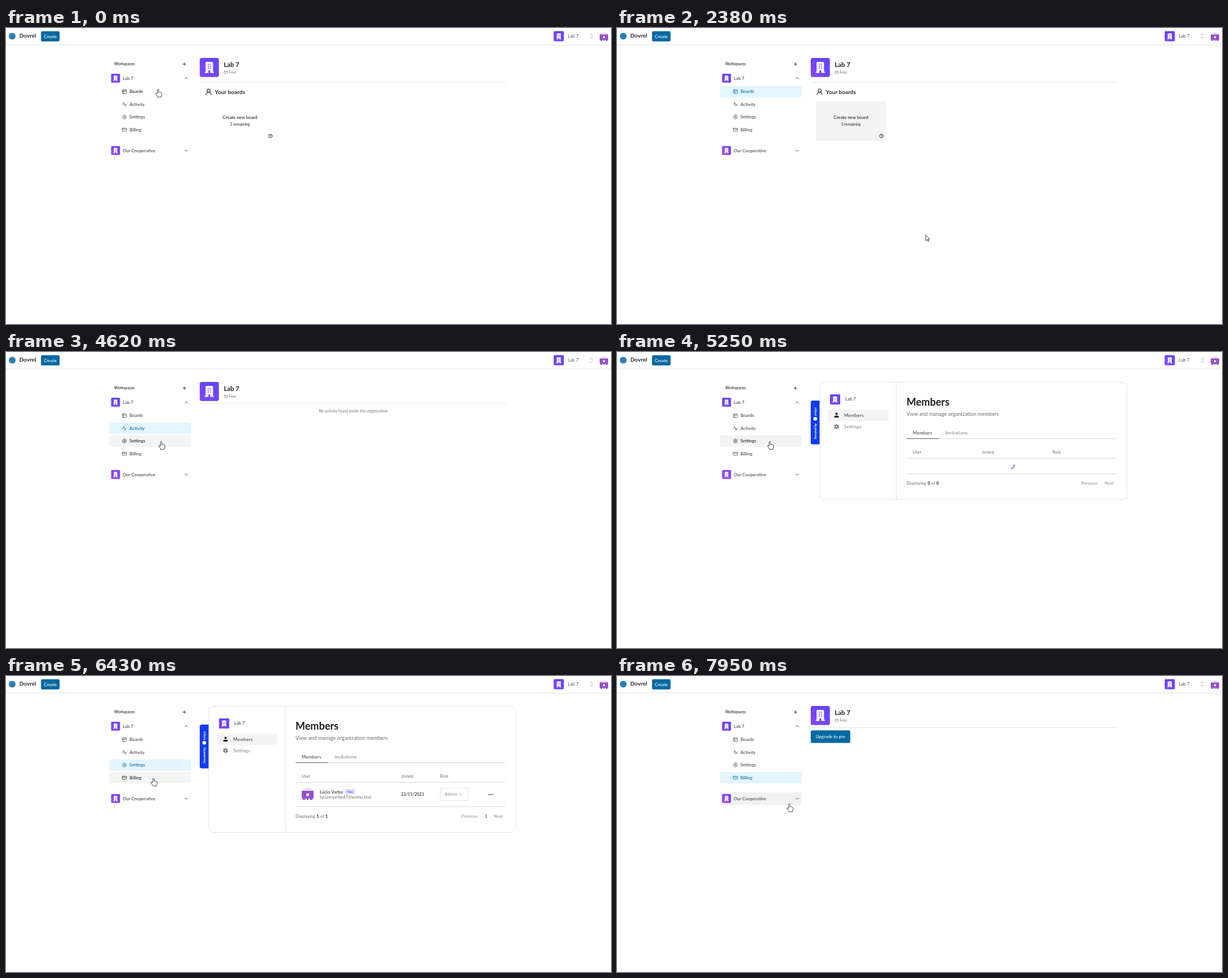
Recreate the animation shown at these times as an HTML page. Size 1068 by 524 pixels, loop 8 s.

```html
<!DOCTYPE html>
<html lang="en">
<head>
<meta charset="utf-8">
<title>Workspace tour</title>
<style>
html, body { margin: 0; width: 100%; height: 100%; overflow: hidden; background: #fff; }
svg { display: block; width: 100vw; height: 100vh; font-family: Lato, "Open Sans", sans-serif; }
text { white-space: pre; }
</style>
</head>
<body>
<svg id="stage" viewBox="0 0 1068 524" xmlns="http://www.w3.org/2000/svg"></svg>
<script>
const LOOP = 8000;
const ORG = 'Lab 7';
const DARK = '#1f1f1f', INK = '#454545', GREY = '#757575', BLUE = '#0369a1', LINE = '#e3e3e3';

const text = (x, y, s, size = 7.875, fill = INK, weight = 500, extra = '') =>
  `<text x="${x}" y="${y}" font-size="${size}" fill="${fill}" font-weight="${weight}" ${extra}>${s}</text>`;
const rect = (x, y, w, h, fill, r = 0, extra = '') =>
  `<rect x="${x}" y="${y}" width="${w}" height="${h}" rx="${r}" fill="${fill}" ${extra}/>`;
const rule = (x1, x2, y, color = LINE, extra = '') =>
  `<path d="M${x1} ${y}H${x2}" stroke="${color}" ${extra}/>`;
const group = (id, body) => `<g id="${id}">${body}</g>`;
const spaced = (n, more = '') => `letter-spacing="${n}" ${more}`;

// Line icons on a 24-unit grid, centred on a point
function gear(r, depth) {
  let d = '';
  for (let i = 0; i < 72; i++) {
    const a = i / 72 * Math.PI * 2;
    const k = r + depth * Math.tanh(2.5 * Math.cos(6 * a));
    d += (i ? 'L' : 'M') + (12 + k * Math.sin(a)).toFixed(2) + ' ' + (12 - k * Math.cos(a)).toFixed(2);
  }
  return d + 'Z';
}
const ICONS = {
  boards: '<rect x="3" y="3" width="18" height="18" rx="2"/><path d="M3 9h18M9 21V9"/>',
  activity: '<path d="M22 12h-4l-3 9L9 3l-3 9H2"/>',
  settings: `<path d="${gear(8.8, 1.2)}"/><circle cx="12" cy="12" r="3"/>`,
  billing: '<rect x="2" y="5" width="20" height="14" rx="2"/><path d="M2 10h20"/>',
  help: '<circle cx="12" cy="12" r="10"/><path d="M9.1 9a3 3 0 0 1 5.8 1c0 2-3 3-3 3M12 17v.1"/>',
  user: '<circle cx="12" cy="8" r="5"/><path d="M20 21a8 8 0 0 0-16 0"/>',
  plus: '<path d="M5 12h14M12 5v14"/>',
  up: '<path d="m18 15-6-6-6 6"/>',
  down: '<path d="m6 9 6 6 6-6"/>',
  updown: '<path d="m6 8 6-6 6 6M6 16l6 6 6-6"/>'
};
const icon = (name, cx, cy, size = 9, color = INK, width = 2) =>
  `<g transform="translate(${cx - size / 2} ${cy - size / 2}) scale(${size / 24})" fill="none" stroke="${color}"
    stroke-width="${width}" stroke-linecap="round" stroke-linejoin="round">${ICONS[name]}</g>`;

// Building badge, centred on a point
const WINDOWS = [3, 5.8, 8.6].map(y => `M4.600 ${y}h1.600v1.600h-1.600zM7.800 ${y}h1.600v1.600h-1.600z`).join('');
const badge = (cx, cy, s, fill = 'url(#violet)') =>
  rect(cx - s / 2, cy - s / 2, s, s, fill, s * .1) +
  `<path transform="translate(${cx} ${cy}) scale(${s * .034}) translate(-7 -8.500)" fill="#fff" fill-rule="evenodd"
    d="M0 15.200V17H5.600V13H8.400V17H14V15.200H12.700V1.400Q12.700 0 11.300 0H2.700Q1.300 0 1.300 1.400V15.200Z${WINDOWS}"/>`;

const avatar = (x, y, s) =>
  `<g transform="translate(${x} ${y}) scale(${s / 21})">
    <path d="M0 7Q2 0 10.500 0T21 7Z" fill="#ecdff4"/>
    <path d="M0 5.500H21V17.500L18.500 21.500H14.500V19H12V21.500H9V19H6.500V21.500H2.500L0 17.500Z" fill="#9750c8"/>
    <rect x="8.300" y="10" width="4.600" height="4.600" fill="#fff"/></g>`;

const NAV = ['boards', 'activity', 'settings', 'billing'];
const rowTop = i => 102.5 + i * 22.5;
const navRow = (name, i) => {
  const cy = rowTop(i) + 10.1;
  return rect(182, rowTop(i), 144, 20.25, 'none', 2.5, `id="bg-${name}"`) +
    `<g id="nav-${name}" color="${INK}">` + icon(name, 209, cy, 9, 'currentColor') +
    text(218, cy + 2.7, name[0].toUpperCase() + name.slice(1), 7.875, 'currentColor') + '</g>';
};

const chrome =
  rule(0, 1068, 30, LINE) +
  '<circle cx="11" cy="14.500" r="6" fill="#2a7fb8"/>' +
  text(23.5, 17.3, 'Dovrel', 10, '#2b2b2b', 700) +
  rect(61.8, 5.7, 32.8, 18, BLUE, 2.2) + text(78.2, 17.500, 'Create', 7.875, '#fff', 500, 'text-anchor="middle"') +
  badge(975.8, 14.6, 18) + text(992, 17, ORG, 7.3, INK, 400, spaced(.2)) +
  icon('updown', 1033.500, 14.500, 9, '#888', 2) + avatar(1048, 7.5, 15) +
  text(191, 66.3, 'Workspaces', 6.75, DARK) + icon('plus', 315, 64, 9, DARK, 2.3) +
  badge(193.4, 88.9, 15.75) + text(206, 91.8, ORG) + icon('up', 318.3, 89, 9, DARK, 2.3) +
  NAV.map(navRow).join('') +
  rect(182, 206, 144, 22.4, 'none', 2.5, 'id="bg-other"') +
  badge(193.4, 216.9, 15.75, 'url(#plum)') + text(206, 219.8, 'Our Cooperative') + icon('down', 318.3, 217, 9, DARK, 2.3);

const header =
  badge(358.9, 69.8, 33.75) + text(384.5, 68.8, ORG, 11.25, DARK, 700) +
  icon('billing', 388.2, 78.6, 7, GREY) + text(393.5, 81, 'Free', 6.75, GREY, 400) +
  rule(342, 884, 0, LINE, 'id="rule"');

const mid = 'text-anchor="middle"';
const boardsPage =
  icon('user', 357.8, 113, 13.5, DARK) + text(368.6, 117, 'Your boards', 10.125, '#303030', 700) +
  rect(351, 130, 124, 69.5, '#f3f3f3', 2, 'id="card"') +
  text(413, 160.8, 'Create new board', 7.875, DARK, 500, mid) +
  text(413, 172.600, '5 remaining', 6.75, DARK, 400, mid) +
  icon('help', 466.6, 191.2, 8, DARK, 2.5);

const loose = (x, y, s, size, fill, weight = 400, ls = .3) => text(x, y, s, size, fill, weight, spaced(ls));
const count = (y, n) => loose(511, y, `Displaying <tspan font-weight="700" fill="#222">${n}</tspan> of <tspan font-weight="700" fill="#222">${n}</tspan>`, 7.3, '#666', 400, .2);
const side = (s, y, ls) => text(0, 0, s, 6.2, '#fff', 700, spaced(ls, `transform="translate(352.300 ${y}) rotate(-90)"`));

const loading =
  loose(644, 180, 'Joined', 7, '#666') + loose(769, 180, 'Role', 7, '#666') +
  '<path id="spin" d="M4 0A4 4 0 0 1 -3.460 2" fill="none" stroke="#3358e8" stroke-width="1.200" stroke-linecap="round"/>' +
  rule(511, 881, 215.8, '#d8d8d8') + count(234.8, 0) +
  loose(819.5, 234.8, 'Previous', 7.3, '#888', 400, .2) + loose(861, 234.8, 'Next', 7.3, '#888', 400, .2);

const dots = [853, 856, 859].map(x => `<circle cx="${x}" cy="210" r="1" fill="#333"/>`).join('');
const loaded =
  loose(697.500, 180, 'Joined', 7, '#666') + loose(766.500, 180, 'Role', 7, '#666') +
  avatar(522, 197.8, 21) + loose(554, 207.9, 'Lúcio Varbo', 7.500, '#222', 500, .2) +
  rect(598.5, 200, 17.5, 9.6, '#d6dcff', 2.5) + text(607.2, 207.200, 'You', 6.4, '#4a60dd', 500, mid) +
  loose(554, 217, 'luciomvarbo47@womu.test', 7.2, '#666', 400, .2) +
  text(697.5, 212.200, '23/11/2023', 7.3, '#222', 500) +
  rect(766.5, 198.5, 49, 22, '#fff', 2, 'stroke="#dcdcdc" stroke-width=".8"') +
  loose(774.5, 212.200, 'Admin', 7.3, '#888') + icon('down', 803, 209.500, 9, '#666') + dots +
  rule(511, 881, 231.4, '#d8d8d8') + count(250.5, 1) +
  loose(803.700, 250.5, 'Previous', 7.3, '#888', 400, .2) + text(845.5, 250.5, '1', 7.3, '#222', 500) +
  loose(861, 250.5, 'Next', 7.3, '#888', 400, .2);

const settingsPage =
  '<path d="M358 86V163.500H345.500Q342 163.500 342 160V89.500Q342 86 345.500 86Z" fill="#123cf0"/>' +
  side('Secured by', 154.500, -.25) + '<circle cx="350" cy="118.300" r="3.300" fill="#fff"/>' +
  side('zelpa', 113.200, .2) +
  rect(358, 53.5, 542, 208, '#fff', 8, `id="panel" stroke="${LINE}"`) +
  '<path id="split" stroke="#dedede"/>' +
  badge(385, 84, 18) + loose(403, 86.3, ORG, 7.3, '#333', 400, .2) +
  rect(372, 102, 107, 20, '#f4f4f4', 2.5) +
  '<circle cx="387.500" cy="109.500" r="2" fill="#222"/><path d="M383.500 116V114.800Q384 112.600 387.500 112.600T391.500 114.800V116Z" fill="#222"/>' +
  loose(401, 114.9, 'Members', 7.875, '#333') +
  `<path transform="translate(382 126.500) scale(.46)" fill="#777" fill-rule="evenodd" d="${gear(8.6, 1.4)}M12 9a3 3 0 1 0 .01 0Z"/>` +
  loose(401, 135, 'Settings', 7.875, '#777') +
  text(511, 95, 'Members', 18, DARK, 700) +
  loose(511, 113, 'View and manage organization members', 9, '#6a6a6a', 400, .1) +
  loose(522, 146.300, 'Members', 7.875, '#333') + loose(580, 146.300, 'Invitations', 7.875, '#777') +
  rule(511, 881, 153.5, '#d8d8d8') + rule(511, 568, 153.3, '#555') +
  loose(522, 180, 'User', 7, '#666') + rule(511, 881, 188.200, '#d8d8d8') +
  group('loading', loading) + group('loaded', loaded);

const upgrade = rect(342, 96.3, 69.8, 22.3, BLUE, 2.5) + text(376.900, 110.200, 'Upgrade to pro', 7.875, '#fff', 500, mid);

const pointer =
  '<g id="cursor" fill="#fff" stroke="#222" stroke-width=".85" stroke-linejoin="round">' +
  '<path id="arrow" d="M0 0V10.200L2.400 8L4 11.500L5.600 10.800L4.100 7.400H7Z"/>' +
  '<path id="hand" d="M-1.300 8V1.200Q-1.300 0-.100 0T1.100 1.200V5.200Q2 4.400 3 5.300Q4.200 4.800 5 5.900Q6.500 5.600 6.500 7V9.500Q6.400 11.500 5.400 12.400V13.800H-1V12.600Q-3.200 10.500-4.200 8Q-4.400 6.400-3 6.900Z"/></g>';

const ramp = (id, a, b) => `<linearGradient id="${id}" x1="0" y1="1" x2="1" y2="0">
  <stop offset="0" stop-color="${a}"/><stop offset=".6" stop-color="${b}"/></linearGradient>`;

document.getElementById('stage').innerHTML =
  `<defs>${ramp('violet', '#8247f8', '#6b45fb')}${ramp('plum', '#a04cf2', '#7f46f8')}</defs>` +
  chrome + group('header', header) + group('boards', boardsPage) +
  group('empty', text(613, 107.400, 'No activity found inside this organization', 6.75, GREY, 400, mid)) +
  group('settings', settingsPage) + group('billing', upgrade) + pointer;

const el = {};
document.querySelectorAll('[id]').forEach(n => el[n.id] = n);
const set = (id, name, v) => el[id].setAttribute(name, v);
const show = (id, on) => set(id, 'display', on ? 'inline' : 'none');

// Pointer stops: time, x, y
const PATH = [
  [0, 268.5, 108.5], [620, 268.5, 108.5], [660, 284, 124], [960, 382, 180], [1080, 382, 181],
  [1400, 300, 137], [1440, 300, 137], [1640, 614, 404], [2340, 614, 404], [2380, 545.8, 367],
  [3070, 283, 138], [3530, 283, 138], [3550, 276, 137.3], [4320, 276, 139], [4360, 276, 139],
  [4620, 274, 158.500], [4800, 270, 158.500], [5740, 270, 158.500], [5950, 293, 160],
  [6430, 260.3, 181], [7530, 260.3, 181], [7950, 304.3, 226.500], [LOOP, 304.3, 226.500]
];
function pointerAt(t) {
  const i = PATH.findIndex(p => p[0] > t);
  const [t0, x0, y0] = PATH[i - 1], [t1, x1, y1] = PATH[i];
  const u = 1 - (1 - (t - t0) / (t1 - t0)) ** 2;
  return [x0 + (x1 - x0) * u, y0 + (y1 - y0) * u];
}

function draw(t) {
  const page = t < 3850 ? 'boards' : t < 5120 ? 'activity' : t < 6870 ? 'settings' : 'billing';
  const [x, y] = pointerAt(t);
  const inside = (l, top, w, h) => x >= l && x <= l + w && y >= top && y <= top + h;
  const awake = t >= 620;
  let link = false;

  NAV.forEach((name, i) => {
    const over = inside(182, rowTop(i), 144, 20.25);
    const active = name === page;
    link = link || over;
    set('bg-' + name, 'fill', over ? (awake ? '#f4f4f3' : 'none') : active ? '#e3f5fe' : 'none');
    set('nav-' + name, 'color', over ? DARK : active ? BLUE : INK);
  });
  const other = inside(182, 206, 144, 22.4);
  set('bg-other', 'fill', other ? '#f1f1f1' : 'none');
  link = link || other || (page === 'boards' && inside(351, 130, 124, 69.5));

  show('header', page !== 'settings');
  set('rule', 'transform', `translate(0 ${page === 'boards' ? 96 : 91.5})`);
  show('boards', page === 'boards');
  show('card', awake);
  show('empty', page === 'activity' && t >= 4050);
  show('settings', page === 'settings');
  show('billing', page === 'billing' && t >= 6910);

  const ready = t >= 5600, tall = ready ? 223.5 : 208;
  show('loading', !ready);
  show('loaded', ready);
  set('panel', 'height', tall);
  set('split', 'd', `M493 53.500v${tall}`);
  set('spin', 'transform', `translate(697 202) rotate(${(t - 5250) * .45 - 40})`);

  set('cursor', 'transform', `translate(${x.toFixed(2)} ${y.toFixed(2)})`);
  show('hand', link);
  show('arrow', !link);
}

const start = performance.now();
function tick() {
  draw((performance.now() - start) % LOOP);
  requestAnimationFrame(tick);
}
tick();
</script>
</body>
</html>
```
